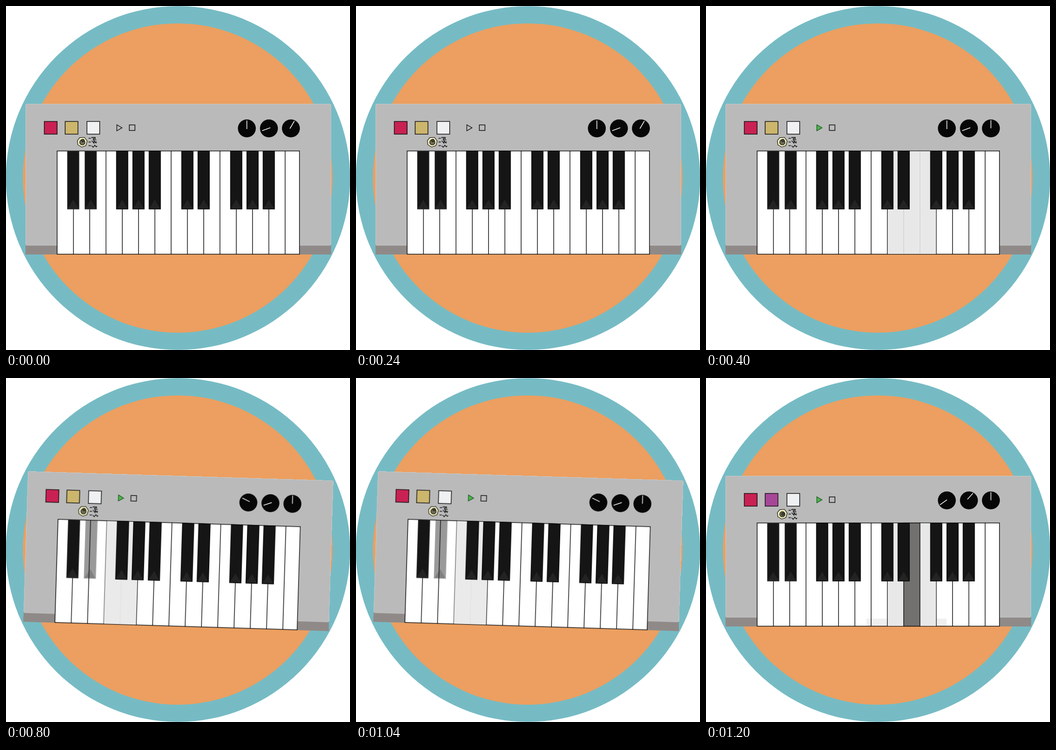
An HTML page for the animation above (1.6 s loop, 748 by 749 pixels).

```html
<!DOCTYPE html>
<html lang="en">
<head>
<meta charset="utf-8">
<title>Synth keyboard</title>
<style>
  html, body { margin: 0; width: 100%; height: 100%; overflow: hidden; background: #fff; }
  svg { display: block; width: 100%; height: 100%; }

  .line { fill: none; stroke: #111; stroke-width: 1.5; }
  .pad { stroke: #111; stroke-width: 1.5; }
  .needles { fill: none; stroke: #fff; stroke-width: 1.5; }
  .pressed { fill: #e8e8e8; }
  .seam { fill: none; stroke: #cecece; stroke-width: 1.2; }
  .black rect { fill: #151515; stroke: #050505; stroke-width: 1.5; }
  .black path { fill: #232323; }
  .black.soft rect { stroke: #2e2e2e; }

  /* Each beat lasts a quarter of the loop; --n picks the beat. */
  .beat { visibility: hidden; animation: beat 1.6s step-end infinite; animation-delay: calc(var(--n) * .4s - 1.6s); }
  .synth { transform-origin: 374.5px 377px; animation: tilt 1.6s step-end infinite; }
  .play { animation: play 1.6s step-end infinite; }
  .swatch { animation: swatch 1.6s step-end infinite; }
  .lever { animation: lever 1.6s step-end infinite; }
  .ghost rect { animation: fade 1.6s step-end infinite; --o: .44; }
  .ghost path { animation: fade 1.6s step-end infinite; --o: .22; }

  @keyframes beat { 0% { visibility: visible } 25%, 100% { visibility: hidden } }
  @keyframes tilt { 0%, 75%, 100% { transform: rotate(0deg) } 50% { transform: rotate(1.75deg) } }
  @keyframes play {
    0% { fill: #bababa; stroke: #111 }
    25%, 100% { fill: #4bb748; stroke: #1f5a25 }
  }
  @keyframes swatch { 0% { fill: #ccb66c } 75%, 100% { fill: #a74798 } }
  @keyframes lever { 0% { transform: translateY(0) } 75%, 100% { transform: translateY(3.5px) } }
  @keyframes fade { 0%, 75%, 100% { opacity: 1 } 50% { opacity: var(--o) } }
</style>
</head>
<body>
<svg viewBox="0 0 748 749">
  <circle cx="374" cy="374.5" r="374.3" fill="#76bbc4"/>
  <circle cx="373.4" cy="374.6" r="336.7" fill="#ec9f60"/>

  <g class="synth">
    <rect x="42.5" y="519" width="664.5" height="22" fill="#8f8a88"/>
    <rect x="43" y="213.5" width="663.5" height="307.5" rx="2" fill="#bababa" stroke="#c9c9c9"/>

    <!-- white keys -->
    <rect x="111.2" y="315.6" width="527" height="224.8" fill="#fff"/>
    <g class="beat" style="--n:3" fill="#efefef">
      <path d="M349 524h45v16h-45zM501 524h22v16h-22z"/>
    </g>
    <rect class="line" x="111.2" y="315.6" width="527" height="224.8"/>
    <path class="line" id="whiteKeys"/>

    <!-- held keys -->
    <g class="beat" style="--n:1">
      <path class="pressed" d="M395.2 316.3H500.2V539.7H395.2z"/>
      <path class="seam" d="M429.9 316.3V539.7M465.3 316.3V539.7"/>
    </g>
    <g class="beat" style="--n:2">
      <path class="pressed" style="fill:#eaeaea" d="M217.5 316.3H287.5V539.7H217.5z"/>
      <path class="seam" style="stroke:#e0e0e0" d="M252.8 316.3V539.7"/>
    </g>
    <g class="beat" style="--n:3">
      <path class="pressed" d="M395.2 316.3H500.2V539.7H395.2z"/>
      <rect class="pad" x="429.9" y="315.6" width="35.4" height="224.8" fill="#72716f"/>
    </g>

    <g id="blackKeys"></g>

    <!-- pads and transport -->
    <rect class="pad" x="83.3" y="251.4" width="27.9" height="27.6" fill="#c92153"/>
    <rect class="pad swatch" x="128.6" y="251.4" width="27.9" height="27.6"/>
    <rect class="pad" x="176" y="251.4" width="27.7" height="27.6" fill="#eff0f2"/>
    <path class="play" d="M241 258.6L252.3 265.2 241 271.8z" stroke-width="1.4"/>
    <rect class="line" x="268.2" y="258.9" width="12.2" height="12.1"/>

    <!-- waveform switch -->
    <path d="M160.4 286.6L170.6 286 176.6 294.2 173.6 304 164.6 307.2 156.2 302.2 155.2 293.2z"
          fill="#efecb9" stroke="#111" stroke-width="1.2"/>
    <circle cx="166" cy="296.7" r="5.8" fill="#6c6a52" stroke="#111" stroke-width="1.2"/>
    <circle class="lever" cx="167.3" cy="292.8" r="2.6" fill="#55533f" stroke="#111" stroke-width="1.2"/>
    <path class="line" d="M179.5 288h5M179.5 296.2h5M179.5 304.3h5
      M186.5 287.8v-1.6h7.6v2.4h-4.2v2.8h6.6
      M186.3 293.3l5 5.4v-5l5.2 5.4M192 296h5.5
      M186.3 304.2l3.2 3.5 3.7-4.5 3.2 3.5 1.8-2"/>

    <!-- knobs -->
    <g fill="#070707">
      <circle cx="523.7" cy="266.5" r="19.5"/>
      <circle cx="571.7" cy="266.5" r="19.5"/>
      <circle cx="619.5" cy="266.5" r="19.5"/>
    </g>
    <g class="needles">
      <path class="beat" style="--n:0" d="M523.7 249.3V268M557 271.5L574.7 265M627 250.5L617.3 267"/>
      <path class="beat" style="--n:1" d="M523.7 249.3V268M557 271.5L574.7 265M619.5 248.5V266.3"/>
      <path class="beat" style="--n:2" d="M510.4 257.3L526.6 264.6M557 271.5L574.7 265M619.5 248.5V266.3"/>
      <path class="beat" style="--n:3" d="M508.7 276.2L524 265.2M568.5 264.3L580.5 250.7M619.5 248.5V266.3"/>
    </g>
  </g>
</svg>
<script>
  const keyLeft = 111.2, keyWidth = 35.41;
  const keyTop = 315.8, blackHeight = 126.2;

  let dividers = "";
  for (let i = 1; i < 15; i++) dividers += `M${keyLeft + i * keyWidth} 315.6V540.4`;
  document.getElementById("whiteKeys").setAttribute("d", dividers);

  // Centres of the black keys; the second one turns translucent for one beat.
  const centres = [146.2, 184.2, 252.6, 288.1, 323.5, 394.4, 429.8, 500.6, 536.1, 571.4];
  document.getElementById("blackKeys").innerHTML = centres.map((x, i) => `
    <g class="black ${i < 2 ? "soft" : ""} ${i === 1 ? "ghost" : ""}">
      <rect x="${x - 12.4}" y="${keyTop}" width="24.8" height="${blackHeight}"/>
      <path d="M${x} 421.5L${x + 11.6} 441H${x - 11.6}z"/>
    </g>`).join("");
</script>
</body>
</html>
```
